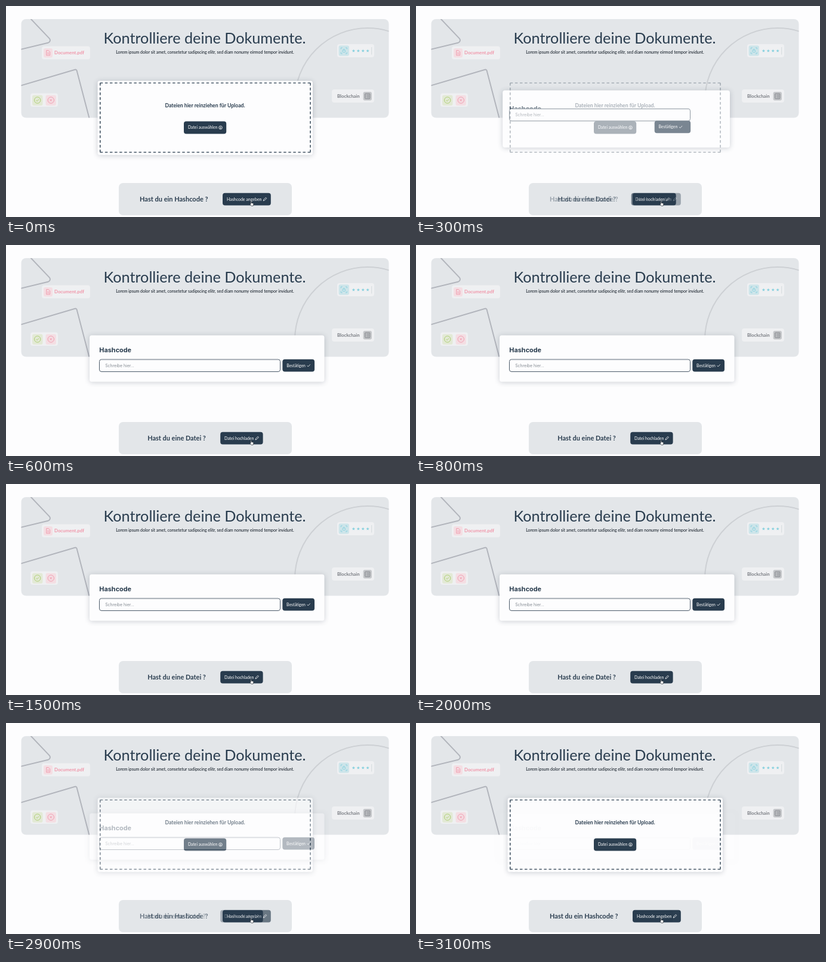
Animation, 677 px wide and 354 px high, one loop 3.6 s. Source, as an HTML page with a canvas:

```html
<!DOCTYPE html>
<html lang="de">
<head>
<meta charset="utf-8">
<title>Kontrolliere deine Dokumente</title>
<style>
html, body { margin: 0; width: 100%; height: 100%; overflow: hidden; background: #fdfdfe; }
canvas { display: block; width: 677px; height: 354px; }
</style>
</head>
<body>
<canvas id="stage"></canvas>
<script>
const W = 677, H = 354, LOOP = 3600, STEP = 100;
const INK = '#293c4e', PANEL = '#e3e6e9', PAPER = '#fdfdfe', CHIP = '#eff0f2';
const PINK = '#f095a9', GREEN = '#a8cc69', CYAN = '#86d0de', GREY = '#797c82';
const LATO = 'Lato, sans-serif', INTER = 'Inter, sans-serif';

const dpr = window.devicePixelRatio || 1;
let ctx;

function layer(canvas) {
  canvas.width = W * dpr;
  canvas.height = H * dpr;
  const c = canvas.getContext('2d');
  c.scale(dpr, dpr);
  c.lineJoin = 'round';
  return c;
}
const screen2d = layer(document.getElementById('stage'));
const buffer2d = layer(document.createElement('canvas'));

const clamp = v => Math.max(0, Math.min(1, v));
const mix = (a, b, k) => a + (b - a) * k;
const mixBox = (a, b, k) => a.map((v, i) => mix(v, b[i], k));

function box([x, y, w, h], r, fill) {
  ctx.beginPath();
  ctx.roundRect(x, y, w, h, r);
  if (fill) { ctx.fillStyle = fill; ctx.fill(); }
}

function text(str, x, y, size, color, weight = 400, align = 'left', family = LATO) {
  ctx.font = `${weight} ${size}px ${family}`;
  ctx.textAlign = align;
  ctx.fillStyle = color;
  ctx.fillText(str, x, y);
}

function stroke(color, width) {
  ctx.strokeStyle = color;
  ctx.lineWidth = width;
  ctx.stroke();
}

function line(points, color, width, close) {
  ctx.beginPath();
  points.forEach(([x, y]) => ctx.lineTo(x, y));
  if (close) ctx.closePath();
  stroke(color, width);
}

function ring(x, y, r, color, width) {
  ctx.beginPath();
  ctx.arc(x, y, r, 0, Math.PI * 2);
  stroke(color, width);
}

function at(x, y, fn) {
  ctx.save();
  ctx.translate(x, y);
  fn();
  ctx.restore();
}

function check(x, y, s, color, width) {
  line([[x - s, y], [x - s * .3, y + s * .7], [x + s, y - s * .7]], color, width);
}

function pencil(x, y) {
  line([[x - 2.8, y + 2.8], [x - 2.2, y + .8], [x + 1.3, y - 2.7],
    [x + 2.7, y - 1.3], [x - .8, y + 2.2]], '#fff', .8, true);
}

function star(x, y, r) {
  ctx.beginPath();
  for (let i = 0; i < 10; i++) {
    const a = i * Math.PI / 5 - Math.PI / 2, q = i % 2 ? r * .42 : r;
    ctx.lineTo(x + q * Math.cos(a), y + q * Math.sin(a));
  }
  ctx.fillStyle = CYAN;
  ctx.fill();
}

function corner(ax, ay, bx, by, cx, cy, r) {
  ctx.beginPath();
  ctx.moveTo(ax, ay);
  ctx.arcTo(bx, by, cx, cy, r);
  ctx.lineTo(cx, cy);
  stroke('#b2b5bc', 2);
}

function documentChip() {
  box([60, 67.5, 81, 22], 4, CHIP);
  box([63, 71, 15, 15.5], 3, '#f4dee3');
  line([[67.7, 74.7], [71.3, 74.7], [73.6, 77], [73.6, 82.8], [67.7, 82.8]], PINK, .9, true);
  line([[69.2, 78.6], [72.1, 78.6]], PINK, .8);
  line([[69.2, 80.6], [72.1, 80.6]], PINK, .8);
  text('Document.pdf', 81, 81.4, 7.8, PINK, 700);
}

function checkChip() {
  box([41, 146.5, 46, 22.5], 4, CHIP);
  box([44, 149.5, 17.5, 17.5], 3, '#e3e9d6');
  box([66.5, 149.5, 17.5, 17.5], 3, '#f4dee3');
  ring(52.7, 158, 5.2, GREEN, .9);
  check(52.7, 158.1, 2.3, GREEN, .9);
  ring(75.3, 158, 5.2, PINK, .9);
  line([[73.4, 156.1], [77.2, 159.9]], PINK, .9);
  line([[77.2, 156.1], [73.4, 159.9]], PINK, .9);
}

function starChip() {
  box([555, 64, 62, 22], 4, CHIP);
  box([557.5, 66.3, 17.5, 17.5], 3, '#cee5ea');
  for (const sx of [-1, 1]) for (const sy of [-1, 1]) {
    const p = (x, y) => [566.3 + sx * x, 75 + sy * y];
    line([p(5, 2.5), p(5, 5), p(2.5, 5)], CYAN, .9);
  }
  box([564, 74.2, 4.6, 3.4], .6);
  stroke(CYAN, .8);
  ctx.beginPath();
  ctx.arc(566.3, 74, 1.6, Math.PI, 0);
  stroke(CYAN, .8);
  for (let i = 0; i < 4; i++) star(582.4 + i * 7.9, 75.3, 2.8);
  line([[612.7, 69], [612.7, 81.5]], '#c8d0d4', .7);
}

function chainChip() {
  box([546, 140, 71, 22], 4, CHIP);
  text('Blockchain', 555, 153.9, 7.8, GREY, 700);
  box([598.5, 144, 14.5, 14.5], 3, '#c5c7ca');
  box([601.6, 147, 8.2, 8.6], .8);
  stroke(GREY, .9);
  for (const y of [149.2, 151.3, 153.4]) {
    line([[603, y], [604.2, y]], GREY, .9);
    line([[605.2, y], [608.4, y]], GREY, .9);
  }
}

function hero() {
  ctx.save();
  box([25.5, 22, 616, 165.5], 8, PANEL);
  ctx.clip();
  corner(39.5, 19.5, 78, 60, 20, 74, 4.5);
  corner(20, 135, 118, 106, 140, 190, 2.5);
  ring(606, 159, 122, '#cdd0d4', 2);
  ctx.restore();
  documentChip();
  checkChip();
  starChip();
  chainChip();
  text('Kontrolliere deine Dokumente.', 333, 63, 25.2, INK, 400, 'center');
  text('Lorem ipsum dolor sit amet, consetetur sadipscing elitr, sed diam nonumy eirmod tempor invidunt.',
    333.5, 80.2, 6.95, '#18212b', 500, 'center');
}

const UP_CARD = [153.5, 125.5, 360.5, 124.5], HASH_CARD = [140, 151.5, 393.5, 78];
const UP_BTN = [298, 193.5, 71.2, 20.9], HASH_BTN = [463.3, 191.8, 53.7, 20.8];
const TO_HASH = [363, 313.8, 80.8, 20.7], TO_FILE = [359.2, 313.8, 71.4, 20.7];

function card(rect) {
  ctx.save();
  ctx.shadowColor = 'rgba(40,55,75,.24)';
  ctx.shadowBlur = 9 * dpr;
  ctx.shadowOffsetY = dpr;
  box(rect, 4, PAPER);
  ctx.restore();
}

function dashes(x1, y1, x2, y2) {
  const len = Math.hypot(x2 - x1, y2 - y1), n = Math.round(len / 8.2);
  const unit = len / (n + .55);
  ctx.setLineDash([unit * .55, unit * .45]);
  line([[x1, y1], [x2, y2]], INK, 1.4);
  ctx.setLineDash([]);
}

function uploadForm() {
  const [l, t, r, b] = [157.8, 129.1, 510, 245.4];
  dashes(l, t, r, t);
  dashes(l, b, r, b);
  dashes(l, t, l, b);
  dashes(r, t, r, b);
  text('Dateien hier reinziehen für Upload.', 333.5, 169.6, 8.65, INK, 700, 'center');
  box(UP_BTN, 4, INK);
  text('Datei auswählen', 305, 206.4, 6.8, '#fff');
  ring(359.5, 204, 2.8, '#fff', .8);
  line([[359.5, 202.4], [359.5, 205.5]], '#fff', .7);
  line([[358.1, 204.2], [359.5, 205.6], [360.9, 204.2]], '#fff', .7);

  text('Hast du ein Hashcode ?', 224, 328.3, 11, INK, 700);
  box(TO_HASH, 4, INK);
  text('Hashcode angeben', 370, 326.5, 7, '#fff');
  pencil(434, 324);
}

function hashForm(k) {
  const over = k - 1;
  text('Hashcode', 156.3, 179.6 + over * 10, 10.9, INK, 700, 'left', INTER);
  at(0, over * 51, () => {
    box([156.5, 192, 303, 20.5], 3.5, PAPER);
    stroke('#4b5a69', 1);
    line([[159.5, 192.9], [456.5, 192.9]], '#c9ced3', .8);
    text('Schreibe hier...', 166.2, 204.7, 6.9, '#858b92', 400, 'left', INTER);
  });
  const ok = mixBox(UP_BTN, HASH_BTN, k);
  box(ok, 4, INK);
  text('Bestätigen', ok[0] + 6.8, ok[1] + 12.8, 6.8, '#fff');
  check(ok[0] + 43.8, ok[1] + 10.4, 2.6, '#fff', .8);

  text('Hast du eine Datei ?', 237.2, 328.3, 10.95, INK, 700);
  const file = mixBox(TO_HASH, TO_FILE, k);
  box(file, 4, INK);
  text('Datei hochladen', file[0] + 6.8, 326.5, 6.9, '#fff');
  pencil(file[0] + 61.5, 324);
}

function hand() {
  at(408, 327, () => {
    ctx.beginPath();
    ctx.moveTo(2.1, 5);
    ctx.lineTo(2.1, 1.5);
    ctx.quadraticCurveTo(2.7, .5, 3.3, 1.5);
    ctx.lineTo(3.3, 3.5);
    ctx.lineTo(6, 4);
    ctx.quadraticCurveTo(7, 4.3, 6.8, 5.4);
    ctx.lineTo(6, 8.4);
    ctx.lineTo(3, 8.4);
    ctx.lineTo(.7, 5.6);
    ctx.quadraticCurveTo(1, 4.5, 2.1, 5.5);
    ctx.closePath();
    ctx.fillStyle = '#fff';
    ctx.fill();
    stroke('#11181f', .6);
  });
}

// Springy morph towards the hash form.
function spring(t) {
  const s = t - 250;
  if (s < 0) return 0;
  return s > 800 ? 1 : 1 - Math.exp(-s / 70) * Math.cos(s / 75);
}

// Plain dissolve back to the upload form.
function dissolve(t) {
  const u = clamp((Math.min(t, 3100) - 2550) / 600);
  return u < .5 ? 2 * u * u : 1 - 2 * (1 - u) ** 2;
}

// Paints one whole view; k is the state of the card morph.
function scene(target, form, k) {
  ctx = target;
  ctx.fillStyle = PAPER;
  ctx.fillRect(0, 0, W, H);
  hero();
  box([189, 297, 290, 54], 7, PANEL);
  card(mixBox(UP_CARD, HASH_CARD, k));
  form(k);
  hand();
}

function draw(t) {
  const k = spring(t), back = dissolve(t);
  scene(screen2d, hashForm, k);
  scene(buffer2d, uploadForm, back > 0 ? 0 : k);
  screen2d.globalAlpha = 1 - clamp(k) * (1 - back);
  screen2d.drawImage(buffer2d.canvas, 0, 0, W, H);
  screen2d.globalAlpha = 1;
}

const start = performance.now();
function loop() {
  const t = (performance.now() - start) % LOOP;
  draw(Math.floor(t / STEP) * STEP);
  requestAnimationFrame(loop);
}
loop();
</script>
</body>
</html>
```
